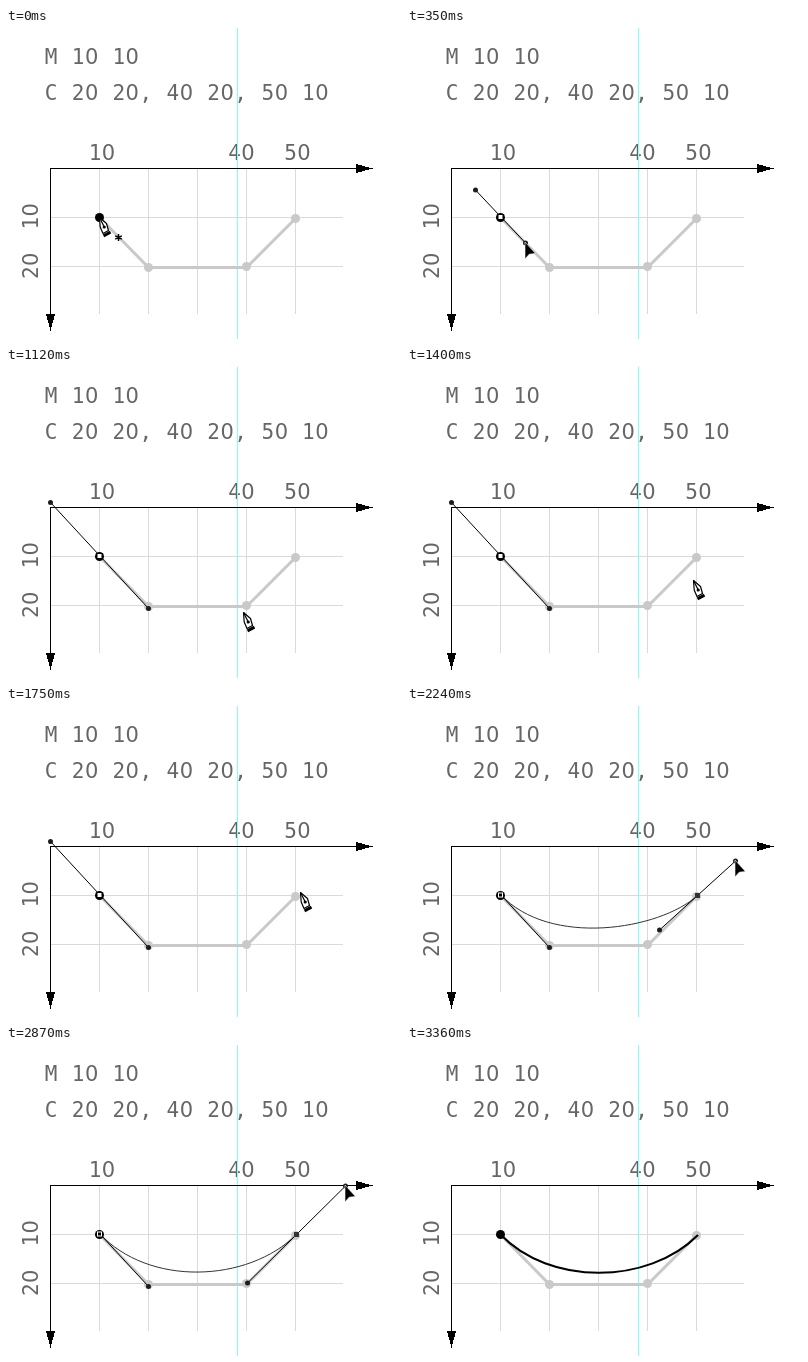
Write an HTML page that moves like this. It is 395 px wide and 311 px high and loops after 4360 ms.

```html
<!DOCTYPE html>
<html lang="en">
<head>
<meta charset="utf-8">
<title>Drawing a cubic curve</title>
<style>
  html, body { margin: 0; width: 100%; height: 100%; overflow: hidden; background: #fff; }
  svg { display: block; width: 395px; height: 311px; }
  text { font: 21px "DejaVu Sans Mono", monospace; fill: #666; text-anchor: middle; }
  .zero { font-family: "DejaVu Sans", sans-serif; font-weight: 400; }
  .crisp { shape-rendering: crispEdges; }
</style>
</head>
<body>
<svg id="stage" viewBox="0 0 395 311" xmlns="http://www.w3.org/2000/svg">
  <g id="labels"></g>
  <path class="crisp" fill="none" stroke="#dadada"
    d="M93.5 141V286M142.5 141V286M191.5 141V286M240.5 141V286M289.5 141V286M45 189.5H337M45 238.5H337"/>
  <path class="crisp" stroke="#80ffff" d="M231.5 0V311"/>
  <path class="crisp" fill="none" stroke="#000" d="M352 140.5H44.5V288"/>
  <path class="crisp" d="M350 136L367 140.5L350 145ZM40 286H49L44.5 303Z"/>
  <g fill="#c9c9c9">
    <path fill="none" stroke="#c9c9c9" stroke-width="3" d="M93.5 189.5L142.5 239.5H240.5L289.5 190.5"/>
    <circle cx="142.5" cy="239.5" r="4.5"/>
    <circle cx="240.5" cy="238.5" r="4.5"/>
    <circle cx="289.5" cy="190.5" r="4.5"/>
  </g>
  <circle cx="93.5" cy="189.5" r="4.5"/>
  <g id="editing">
    <path id="curve" fill="none" stroke="#333"/>
    <path id="arms" fill="none" stroke="#000"/>
    <g id="knobs" fill="#1c1c1c">
      <circle r="2.5"/><circle r="2.5"/><circle r="2.5"/>
    </g>
    <rect id="openAnchor" x="91" y="186.5" width="5" height="5" fill="#fff" stroke="#000"/>
    <rect id="ringAnchor" x="91.5" y="187" width="4" height="4" stroke="#fff"/>
    <rect id="endAnchor" class="crisp" x="288" y="187" width="5" height="5" fill="#333"/>
    <path id="arrow" stroke="#fff" stroke-width=".6" d="M0 0V17L4.2 12.2L10.5 11.5Z"/>
    <g id="pen" stroke="#000" stroke-width="1.2" stroke-linejoin="round">
      <path fill="#fff" d="M.5 .5L7.5 6.5L9.5 13.5L4 16.5L1.2 10Z"/>
      <path fill="none" d="M.5 .5L5 9.5"/>
      <circle cx="5.2" cy="10" r="1"/>
      <path stroke-width="3" d="M4.5 18.8L11.5 15.2"/>
      <path id="star" stroke-width="1.5" d="M19.5 17V24M16.2 18.8L22.8 22.2M16.2 22.2L22.8 18.8"/>
    </g>
  </g>
  <path id="result" fill="none" stroke="#000" stroke-width="2" d="M93.5 189.5C142.5 240.5 240.5 240.5 291 190"/>
</svg>
<script>
const LOOP = 4360, STEP = 70, PITCH = 13.55;
const NS = "http://www.w3.org/2000/svg";
const $ = id => document.getElementById(id);
const show = (id, on) => $(id).setAttribute("display", on ? "inline" : "none");
const make = (name, attrs, parent) => {
  const el = document.createElementNS(NS, name);
  for (const key in attrs) el.setAttribute(key, attrs[key]);
  return parent.appendChild(el);
};

// Characters sit centred on a fixed pitch; x is the centre of the first one.
function label(str, x, y, transform = "") {
  const text = make("text", { transform, "xml:space": "preserve" }, $("labels"));
  [...str].forEach((ch, i) => {
    const attrs = { x: x + i * PITCH, y };
    if (ch === "0") attrs.class = "zero";
    make("tspan", attrs, text).textContent = ch;
  });
}
label("M 10 10", 45, 36);
label("C 20 20, 40 20, 50 10", 45, 72);
label("10", 89, 131.5);
label("40", 228.5, 131.5);
label("50", 284.5, 131.5);
label("10", -PITCH / 2, 0, "translate(32 188.5) rotate(-90)");
label("20", -PITCH / 2, 0, "translate(32 238) rotate(-90)");

// Pointer positions: time, x, y
const track = [
  [140, 93, 189], [560, 143, 239], [630, 143, 239], [770, 145, 240], [840, 145, 240],
  [910, 155, 243], [1120, 237, 245], [1190, 250, 241], [1400, 286, 213], [1540, 292, 188],
  [1680, 292, 188], [1750, 294, 186], [2240, 328, 154], [2590, 339, 140]
];

function pointerAt(t) {
  const i = track.findIndex(p => p[0] > t);
  if (i === 0) return track[0].slice(1);
  if (i < 0) return track[track.length - 1].slice(1);
  const a = track[i - 1], b = track[i];
  const k = (t - a[0]) / (b[0] - a[0]);
  return [a[1] + (b[1] - a[1]) * k, a[2] + (b[2] - a[2]) * k];
}

const mirror = (p, c) => [2 * c[0] - p[0], 2 * c[1] - p[1]];
const first = [93.5, 188.5], last = [290.5, 189.5];

function update(time) {
  const t = Math.floor((time % LOOP) / STEP) * STEP;
  const [x, y] = pointerAt(t);
  const tip = [x + .5, y + 1];
  const dragFirst = t >= 210 && t < 910;
  const dragLast = t >= 1820;
  const penMode = t < 210 || (t >= 910 && !dragLast);

  const out = dragFirst ? tip : [142.5, 241.5];
  const back = mirror(dragLast ? tip : out, dragLast ? last : first);
  const ends = [];
  if (t >= 210) ends.push(out, back);
  if (dragLast) ends.push(tip);

  let arms = "";
  if (dragLast) arms = `M${first}L${out}M${back}L${tip}`;
  else if (t >= 210) arms = `M${back}L${out}`;
  $("arms").setAttribute("d", arms);
  $("curve").setAttribute("d", dragLast ? `M${first}C${out} ${back} ${last}` : "");
  [...$("knobs").children].forEach((knob, i) => {
    const p = ends[i];
    knob.setAttribute("display", p ? "inline" : "none");
    if (p) knob.setAttribute("transform", `translate(${p})`);
  });

  show("openAnchor", t >= 210 && !dragLast);
  show("ringAnchor", dragLast);
  show("endAnchor", dragLast);
  show("pen", penMode);
  show("star", t < 210);
  show("arrow", !penMode);
  for (const id of ["pen", "arrow"]) $(id).setAttribute("transform", `translate(${x} ${y})`);

  const fade = Math.min(1, Math.max(0, (t - 3150) / 210));
  $("editing").setAttribute("opacity", 1 - fade);
  $("result").setAttribute("opacity", fade);
}

const begin = performance.now();
function tick() {
  update(performance.now() - begin);
  requestAnimationFrame(tick);
}
tick();
</script>
</body>
</html>
```
